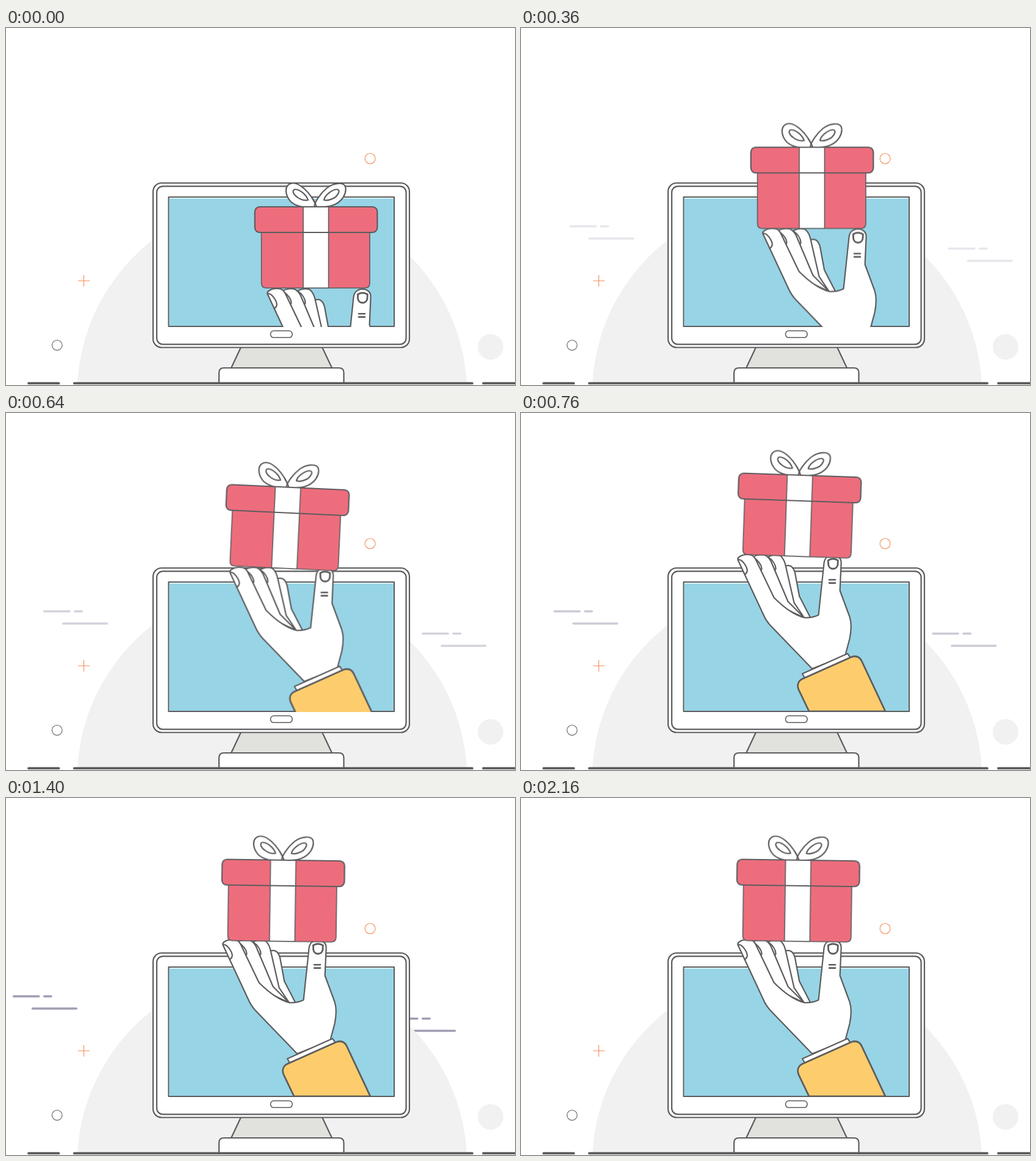
An HTML page that plays this animation: 834 by 585 pixels, repeating every 2.2 s.

```html
<!DOCTYPE html>
<html lang="en">
<head>
<meta charset="utf-8">
<title>Gift from a screen</title>
<style>
  html, body { margin: 0; width: 100%; height: 100%; overflow: hidden; background: #fff; }
  svg { display: block; width: 834px; height: 585px; }

  .ink { stroke: #5c5c5e; stroke-width: 2.2; stroke-linejoin: round; stroke-linecap: round; fill: #fff; }
  .open { fill: none; }
  .thin { stroke-width: 1.6; }
  .bold { stroke-width: 2.8; }
  .red { fill: #ed6d7d; }
  .accent { stroke: #f28d57; stroke-width: 1.1; fill: none; }
  .pale { fill: #f1f1f1; }

  /* The tiny negative delay keeps samples clear of the step edges. */
  .hand, .gift, .tilt, .wind { animation: 2200ms -2ms infinite; }
  .hand { animation-name: reach; }
  .gift { animation-name: lift; }
  .tilt { animation-name: wobble; transform-origin: 507.3px 426px; }
  .wind { animation-name: drift; stroke: #6f668a; stroke-width: 3.6; stroke-linecap: round; }

  @keyframes reach {
    0% { transform: translate(73px, 195px); animation-timing-function: steps(14); }
    25.4545% { transform: translate(23.2px, 41.6px); animation-timing-function: steps(4); }
    32.7273%, 100% { transform: none; }
  }
  @keyframes lift {
    0% { transform: none; animation-timing-function: steps(14); }
    25.4545% { transform: translate(-48.4px, -151.8px); animation-timing-function: steps(4); }
    32.7273%, 100% { transform: translate(-55.3px, -191.2px); }
  }
  @keyframes wobble {
    0%, 25.4545% { transform: rotate(0deg); animation-timing-function: steps(3); }
    30.9091% { transform: rotate(4deg); animation-timing-function: steps(2); }
    34.5455% { transform: rotate(2deg); animation-timing-function: steps(2); }
    38.1818%, 100% { transform: rotate(.8deg); }
  }
  @keyframes drift {
    0% { transform: translateX(13.2px); opacity: 0; animation-timing-function: steps(54); }
    98.16% { transform: translateX(-129.4px); opacity: 1; animation-timing-function: step-end; }
    98.17%, 100% { transform: translateX(-129.4px); opacity: 0; }
  }
</style>
</head>
<body>
<svg viewBox="0 0 834 585">
  <defs>
    <clipPath id="above"><rect width="834" height="490"/></clipPath>
    <path id="dashes" d="M91.8 325H133M141.8 325H153.2M122.8 345H194.4"/>
  </defs>

  <!-- Backdrop -->
  <g class="wind">
    <use href="#dashes"/>
    <use href="#dashes" x="620.2" y="36.5"/>
  </g>
  <path class="pale" d="M117 582A319.5 319.5 0 0 1 755 582Z"/>
  <circle class="pale" cx="794" cy="522.5" r="21"/>
  <circle class="accent" cx="596.6" cy="214" r="8.5"/>
  <path class="accent" d="M118 414.3H137.3M127.5 404.7V423.7"/>
  <circle class="ink" cx="83.7" cy="519.8" r="8.3" style="stroke-width:1.1"/>

  <!-- Monitor -->
  <path class="ink" style="fill:#e1e1de" d="M385 523H518L534 557H369Z"/>
  <path class="ink" d="M349 582V565Q349 557 357 557H545.5Q553.5 557 553.5 565V582"/>
  <path class="ink open" style="stroke-width:3.8" d="M37 582.2H86.5M111.8 582.2H764M782 582.2H840"/>
  <rect class="ink" x="241" y="254" width="420" height="269.5" rx="14"/>
  <rect class="ink" x="247" y="259.3" width="408.6" height="259" rx="10"/>
  <path class="pale" d="M248.5 503Q249 517 263 517H257Q248.5 516 248.5 508ZM654 503Q653.5 517 640 517H646Q654 516 654 508Z"/>
  <rect class="ink" x="266.5" y="277" width="369.5" height="212" stroke-linejoin="miter"/>
  <rect x="267.5" y="279.3" width="367.4" height="208.7" fill="#97d4e6"/>
  <rect class="ink thin" x="433.5" y="496.3" width="35.5" height="11" rx="5"/>

  <!-- Hand -->
  <g clip-path="url(#above)">
    <g class="hand">
      <path class="ink" d="M433 251C440 248 446 251 449 262L456 300L474 335L464 336L440 300Z"/>
      <path class="ink" d="M403 237C412 231 424 231 427 236C431 240 433 247 434 252L447.5 311L464 335.5L430 310Z"/>
      <path class="ink open" d="M406 237C412 241 417 248 417.500 255Q416.500 259 414 259.500"/>
      <path class="ink" d="M378 237C387 231 399 231 403 235C406 237 408.500 241 410 244L437.500 309L464 335.500L410 310Z"/>
      <path class="ink open" d="M382 237.500C389 242 394 249 394.500 255Q393.500 259 391 259.500"/>
      <path class="ink" d="M477 419L409 348.500C403 342 400 337 397 330L355.500 241C354 237 358 235 363 233C371 231 379 232 382 236Q384.500 239 386.500 244L414.500 302.500C430 318 447 331 464 335.300C474 336.300 481 334 487.500 331L496.500 246C497.500 237 504 232.800 511 232.800C519 232.800 525 238 524.600 246L522.600 291L538.500 334C542 345 541 358 538.500 370L531 398Z"/>
      <path class="ink open" d="M356 240.500C362 239 370 251 370.800 258Q370 263 366.500 264.500"/>
      <path class="ink bold" d="M503.300 241.500Q511 236.500 519.300 241.500L519 248.500C517.500 257.500 505 257.500 503.600 248.500Z"/>
      <path class="ink open" style="stroke-width:2.6" d="M505 273.300H515M505 278.600H515"/>
      <path class="ink" d="M461 427.300L535 394.200L540.500 402L465.500 435Z"/>
      <path class="ink bold" fill-rule="evenodd" style="fill:#fdcd6d" d="M472 489L455 453.500C452 446 454 439 461.500 435.500L541 400C549 397 554.500 399.500 558 406L597 489Z"/>
    </g>
  </g>

  <!-- Gift -->
  <g class="gift"><g class="tilt">
    <path class="ink" d="M509 293C499 269 480 252 467.500 254.500C455 258 457 274 467 285C474 291 484 294 492 293Z"/>
    <path class="ink" d="M505 293C506 285 515 271 526 262C537 253.500 553 252 556 260C559 272 550 283 541 288C532 293 525 293 520 293Z"/>
    <path class="ink open" d="M509 293Q506 285 502 279"/>
    <path class="ink" d="M495 282C492 273 481 264 473 264.500C468 266 471 273 477 277C482 281 489 283 495 282Z"/>
    <path class="ink" d="M521 282C522 274 535 264 543 264.500C548 266 545 272 540 277C534 281 527 283 521 282Z"/>
    <path class="ink red thin" d="M418.500 334V418Q418.500 426 426.500 426H588Q596 426 596 418V334Z"/>
    <rect class="ink thin" x="487" y="334" width="41.500" height="92"/>
    <rect class="ink red" x="407.700" y="293" width="200.700" height="42" rx="8"/>
    <rect class="ink thin" x="487" y="293" width="41.500" height="42"/>
    <path class="ink open" d="M416 335H600M487 293H528.500"/>
  </g></g>
</svg>
</body>
</html>
```
